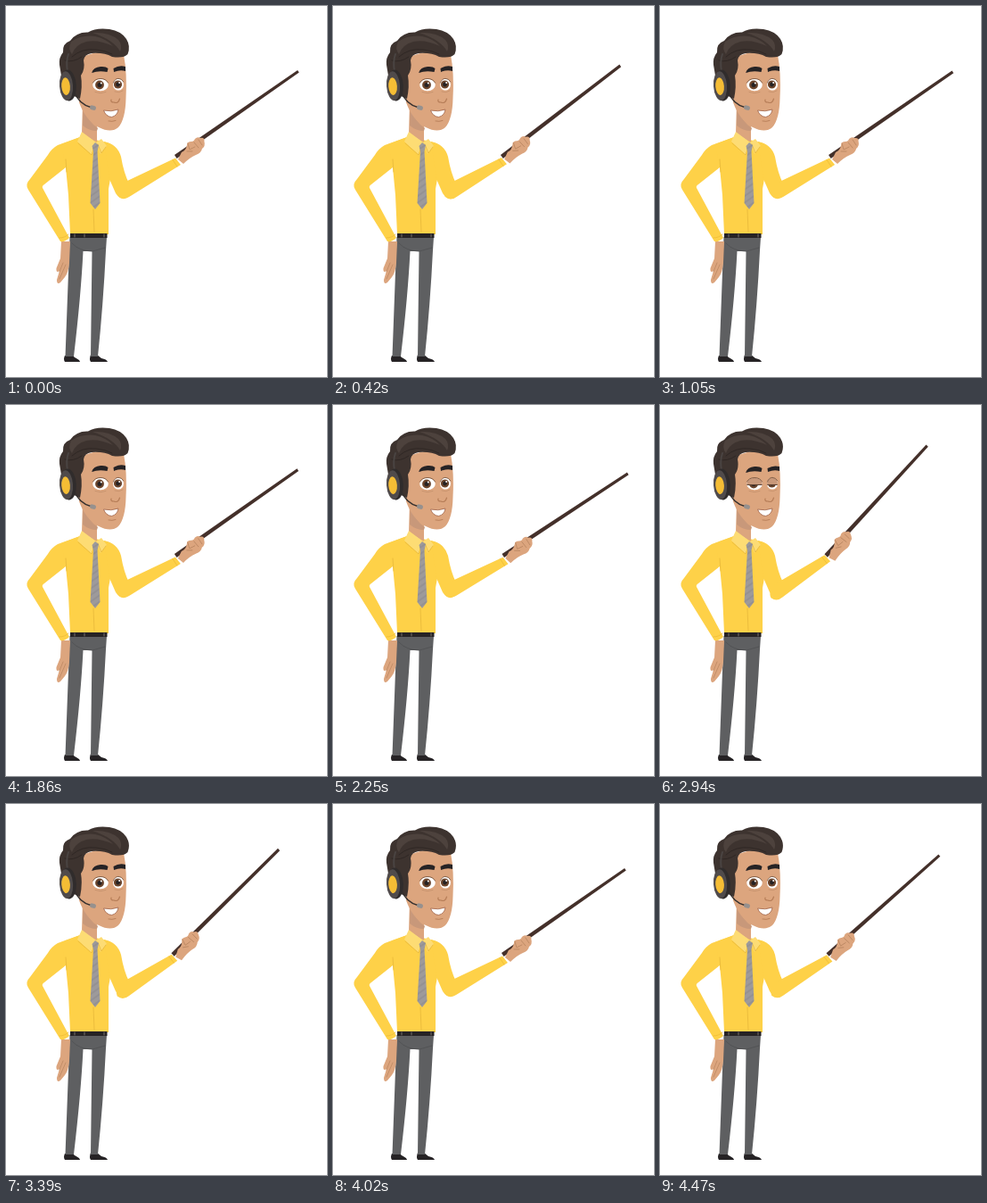
These frames come from a looping animation (360x416 px, 4500 ms). An HTML page:

```html
<!DOCTYPE html>
<html lang="en">
<head>
<meta charset="utf-8">
<title>Presenter with pointer</title>
<style>
  html, body { margin: 0; width: 100%; height: 100%; overflow: hidden; background: #fff; }
  svg { display: block; width: 360px; height: 416px; }
  .skin { fill: #dca57e; }
  .shade { fill: #c8987a; }
  .shirt { fill: #fed148; }
  .light { fill: #fddc74; }
  .hair { fill: #3d332f; }
  .lock { fill: #4d423d; }
  .pants { fill: #5e5f61; }
  .black { fill: #262325; }
  .line { fill: none; stroke-linecap: round; stroke-linejoin: round; }
</style>
</head>
<body>
<svg viewBox="0 0 360 416">
  <defs>
    <clipPath id="eyes">
      <ellipse cx="106" cy="88.5" rx="8.8" ry="6.8"/>
      <ellipse cx="126" cy="88" rx="6" ry="6.600"/>
    </clipPath>
    <pattern id="stripes" width="6" height="6" patternUnits="userSpaceOnUse" patternTransform="rotate(-35)">
      <path fill="#9d9a9b" d="M0 0h6v6H0z"/>
      <path fill="#949193" d="M0 0h6v2H0z"/>
    </pattern>
  </defs>

  <!-- legs -->
  <path class="black" d="M66 392Q64 396 66 399H83Q83 397 77 394L74 391ZM95 391Q93 396 95 399H114Q113 396 107 395L102 391Z"/>
  <path class="pants" d="M71.500 259H113L112 274Q109 335 103 393H95L96.500 275H86.500Q84 325 76 393H66.500Z"/>
  <path class="line" stroke="#525355" d="M74 266Q82 275 97 275L111 271"/>

  <!-- resting arm -->
  <path class="skin" d="M62 264H72L71 288Q70 299 66 304L61 310Q57 313 57 307L60 297Q56 300 56.500 294L61 283Z"/>
  <path class="line" stroke="#bb8863" stroke-width=".8" d="M67 290L60 306M64 288L60 298"/>
  <path class="shirt" d="M83 147L58 156Q51 160 47 167L27 194Q21 200 25 206L61 264Q66 265 71 260L41 204Q40 202 43 200L67 181Z"/>
  <path class="line" stroke="#eebc37" stroke-width=".8" d="M60 260Q66 260 70 256"/>

  <!-- torso -->
  <path class="shirt" d="M83 147L62 155L67 181L70 212L72 256H115V205L117 194Q122 190 128 181Q127 160 116 154L105 151Z"/>
  <path class="black" d="M72 255H113.500V260H72Z"/>
  <path class="line" stroke="#77706c" d="M88 256V259M110 256V259M77 256V259"/>
  <path class="line" stroke="#e8b83a" stroke-width=".8" d="M67 172L68 186M117 175L117 194M98 228L99 253"/>

  <!-- pointing arm -->
  <path class="shirt" d="M110 152Q125 155 129 169Q132 187 138 199L135 215Q129 219 123 210L116 194Z"/>
  <g id="arm">
    <path class="shirt" d="M132 198L190 170.500L196 178L139 213.500Q132 218.500 126 213Q123 206 132 198Z"/>
    <path class="line" stroke="#eebc37" stroke-width=".8" d="M187 172.500L192 180"/>
    <g id="hand">
      <path fill="#44302a" d="M189 167L191.600 171L329 75L327.300 72.300Z"/>
      <path class="skin" d="M193 172L197 164Q202 162 203 156Q203 152 208 152Q211 152 212 149Q215 146 218 148Q223 147 222.500 152Q224 157 220 160Q219 165 213 167Q206 170 199 177Z"/>
      <path class="line" stroke="#bb8863" stroke-width=".9" d="M204 154L206 161L212 158M211 153L216 159M216 150L220 156M203 163L209 163"/>
    </g>
  </g>

  <!-- neck, collar, tie -->
  <path class="skin" d="M86 108H106L102 138V153L85 143Z"/>
  <path class="shade" d="M86.500 113Q92 130 103 137L102 140Q93 140 86 134Z"/>
  <path class="light" d="M85 141L101 153L96 167L80 152ZM107 149L101 153L106 166L113 157Z"/>
  <path class="line" stroke="#e8b83a" stroke-width=".8" d="M81 154L96 167L100 155M103 155L107 165L112 158"/>
  <path fill="url(#stripes)" d="M100 153L104 156L102.500 163L105.500 221L100 228L94.500 221L98 163L96.500 157Z"/>

  <!-- head -->
  <path class="skin" d="M84 58Q108 46 132 55Q136 75 134.500 103Q134 127 126 136Q118 143 104 136Q89 128 82 108L78 76Z"/>
  <path class="hair" d="M83 104Q86 90 84 78Q89 71 87 61Q88 54 96 53Q110 52 119 57Q132 59 136.500 54Q140 45 135 37Q129 28 116 26Q101 24 92 29.500Q79 29 72 39Q63 42 64 52Q59 58 60 66L62 78L74 100Z"/>
  <path class="lock" d="M73 40Q85 32 100 34Q113 37 120 45Q103 37 90 40Q78 43 74 54Q69 48 73 40ZM97 30Q116 29 126 38Q131 44 128 51Q121 38 97 30Z"/>
  <path class="line" stroke="#2f2724" d="M74 57Q85 47 101 49Q112 50 119 54M66 61Q75 64 85 57"/>

  <g clip-path="url(#eyes)">
    <path fill="#fff" d="M94 78H136V99H94Z"/>
    <circle cx="105" cy="88.500" r="4.900" fill="#6a442c"/>
    <circle cx="125.500" cy="88" r="4.600" fill="#6a442c"/>
    <g class="black"><circle cx="105" cy="88.500" r="2.500"/><circle cx="125.500" cy="88" r="2.400"/></g>
    <g fill="#fff"><circle cx="106.800" cy="86.500" r="1"/><circle cx="127.200" cy="86" r="1"/></g>
    <g id="lids">
      <path class="shade" d="M92 58H138V80H92Z"/>
      <path class="line" stroke="#5b4032" stroke-width="1" d="M92 80H138"/>
    </g>
  </g>
  <path class="line" stroke="#7a563f" stroke-width=".9" d="M97.500 86Q100 81.500 106 81.500Q112 81.500 114.500 86M120.500 86Q122 81.500 126 81.300Q130 81.500 131.800 85"/>
  <path class="line" stroke="#c38e69" stroke-width=".8" d="M100 96.500Q106 99 112 96.500M122 96Q127 98 131 95"/>
  <g id="brows" class="black">
    <path d="M96 75Q98 68.500 106 68Q112 67.500 114.500 70L113.500 74Q104 72 96 75Z"/>
    <path d="M120.500 70Q127 66 134 68L134 73Q128 71 121 74Z"/>
  </g>
  <path class="line" stroke="#b67d57" stroke-width="1.200" d="M118 105Q117 108 121 108Q126 110 127.500 104"/>
  <path fill="#fff" stroke="#a0644a" stroke-width=".8" d="M109.500 117Q118 119 126 116Q125 123 118.500 124.500Q112 124 109.500 117Z"/>
  <path class="line" stroke="#b67d57" stroke-width=".9" d="M115 129Q119 130 123 128.500"/>

  <!-- headset -->
  <path class="line" stroke="#4a4442" stroke-width="2" d="M69 73Q67 62 70 54"/>
  <path class="line" stroke="#35302f" stroke-width="1.500" d="M77 97Q82 110 95 113.500"/>
  <rect x="94" y="111.500" width="7" height="5" rx="2.300" fill="#96918e" transform="rotate(12 97 114)"/>
  <g transform="rotate(-4 69 89)">
    <ellipse cx="70" cy="89" rx="8.800" ry="17.500" fill="#302c2c"/>
    <ellipse cx="67.500" cy="89.500" rx="7.500" ry="16.500" fill="#504b4b"/>
    <ellipse cx="67" cy="90" rx="4.800" ry="9.800" fill="#f5bd35"/>
  </g>
</svg>
<script>
  const LOOP = 4500;
  const byId = id => document.getElementById(id);
  const arm = byId('arm'), hand = byId('hand'), lids = byId('lids'), brows = byId('brows');

  // [time, wag cycles], [time, lid closure]
  const wag = [[0, .19], [1050, 2.81], [1860, 4.8], [2250, 5.833], [2940, 7.5], [4020, 10.19], [4500, 11.384]];
  const blink = [[0, 0], [2850, 0], [2940, .55], [2985, .9], [3015, .9], [3120, 0], [4500, 0]];

  function at(keys, t) {
    const i = keys.findIndex(k => k[0] > t);
    const [t0, a] = keys[i - 1], [t1, b] = keys[i];
    return a + (b - a) * (t - t0) / (t1 - t0);
  }

  function draw(t) {
    const lift = 3.5 - 9.45 * Math.cos(at(wag, t) * 2 * Math.PI);
    const k = lift / 12.9;
    arm.setAttribute('transform', `translate(${-1.5 * k} ${2.8 * k}) rotate(${-5 * k} 131 214)`);
    hand.setAttribute('transform', `rotate(${-7.7 * k} 208 160)`);

    const shut = at(blink, t);
    lids.setAttribute('transform', `translate(0 ${17 * shut})`);
    brows.setAttribute('transform', `translate(0 ${2 * shut})`);
  }

  const start = performance.now();
  function tick() {
    draw((performance.now() - start) % LOOP);
    requestAnimationFrame(tick);
  }
  tick();
</script>
</body>
</html>
```
